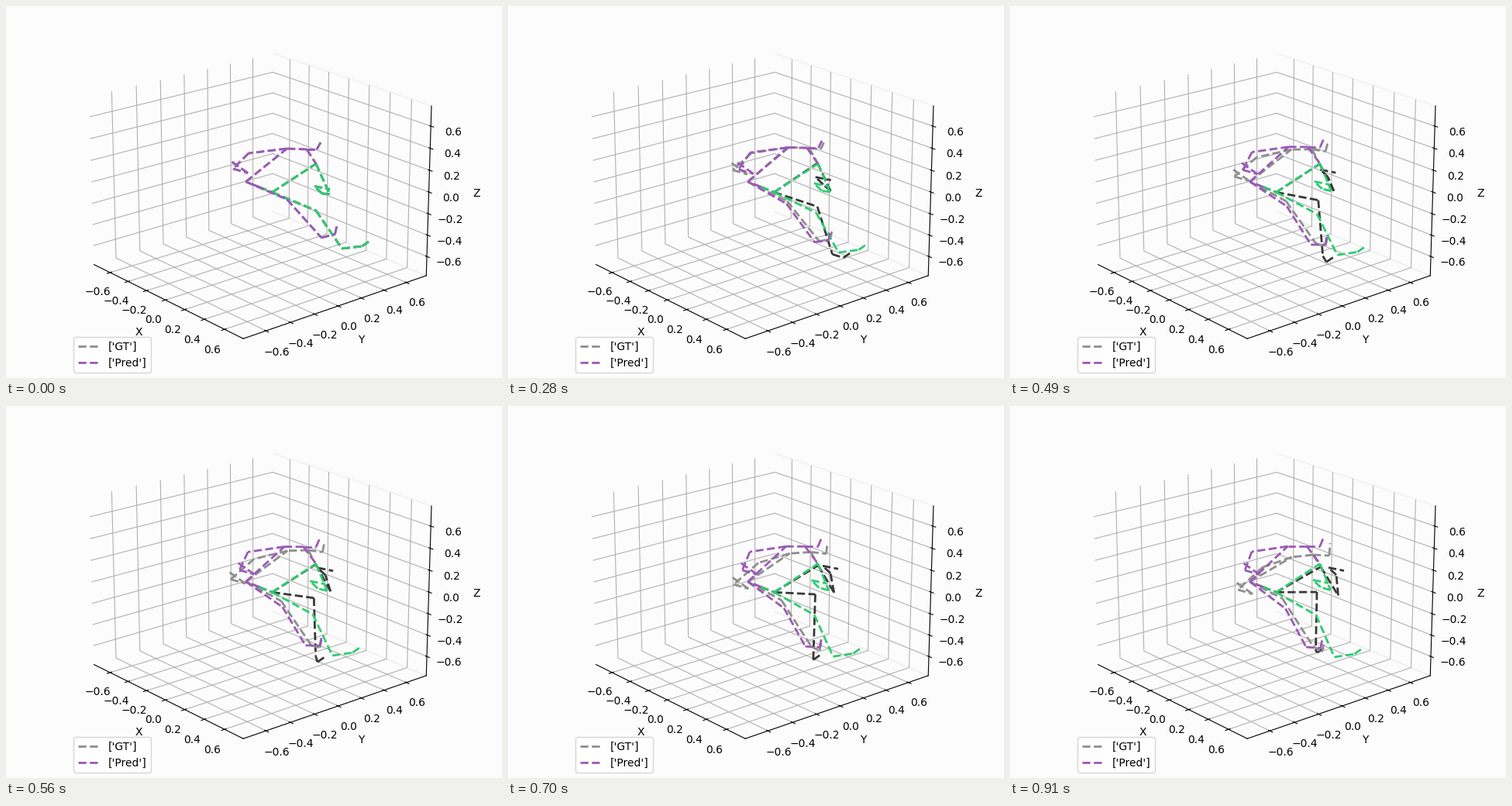
Recreate the animation shown at these times as a matplotlib script. Size 640 by 480 pixels, loop 0.98 s.

```python
import matplotlib.pyplot as plt
import numpy as np
from matplotlib.animation import FuncAnimation

W, H = 640, 480
FRAMES, STEP_MS = 14, 70
BACK = "#fcfcfc"

ROOT = np.array([326.5, 233.5])
HIP_OFFSET = np.array([17, 6.8])
HIPS = {"left": ROOT - HIP_OFFSET, "right": ROOT + HIP_OFFSET}

# Opening pose, shared by both bodies: joints from the trunk outwards.
START = {
    "left leg": [(362.5, 249.5), (407, 299), (424.5, 294.5), (427, 283)],
    "right leg": [(400, 264), (433.5, 313), (459.5, 310), (468, 304)],
    "left arm": [(362.5, 184), (313, 190), (293, 210), (312, 215.5), (288, 198.5)],
    "right arm": [(400, 203.5), (417.5, 242.5), (408, 242), (398, 232.5), (418, 236.5)],
    "head": [(388, 185), (401, 185), (406, 176)],
}

# How far the first joint, the second and the rigid end of each limb travel.
TRUE_DRIFT = {
    "left leg": [(-11, -1), (-16, 11), (-22, 23)],
    "right leg": [(-4, -24), (-39, 3), (-63, 8)],
    "left arm": [(1, 11), (13, 18), (1, 27)],
    "right arm": [(1, 4), (6, 2), (13, -24)],
    "head": [(3, 7), (11, 8), (7, 1)],
}
PRED_DRIFT = {
    "left leg": [(-7, 12), (-25, 12), (-24, 18)],
    "right leg": [(-5, 6), (-15, 11), (-15, 10)],
    "left arm": [(-4, -3), (-1, -2), (10, 2)],
    "right arm": [(0, 0), (-4, -5), (-7, -8)],
    "head": [(-5, -4), (-1, -4), (-2, -5)],
}

# Sideways bulge of the path, from the limb's first joint to its end.
TRUE_BOW = {
    "left leg": [(0, 3), (-5, 2)],
    "right leg": [(0, 0), (-16, 16)],
    "left arm": [(0, -5), (-4, -5)],
    "right arm": [(-1, -2), (-5, -8)],
    "head": [(0, -4), (0, 0)],
}


def ease_in_out(u):
    return (1 - np.cos(np.pi * u)) / 2


def ease_out(u):
    return np.sin(np.pi * u / 2)


def pose(drift, bow, ease, u):
    """Joint positions of every limb at progress u."""
    limbs = {}
    for name, points in START.items():
        part = np.minimum(np.arange(len(points)), 2)
        move = np.array(drift[name]) * ease(u)
        if bow:
            move = move + np.linspace(*np.array(bow[name]), 3) * np.sin(np.pi * u)
        limbs[name] = np.array(points) + move[part]
    return limbs


def bones(limbs):
    """Pairs of end points: right side, left side, then neck and head."""
    pairs = []
    for name in ("right", "left"):
        leg = [ROOT, HIPS[name], *limbs[name + " leg"]]
        arm = [HIPS[name], *limbs[name + " arm"]]
        pairs += [*zip(leg, leg[1:]), *zip(arm, arm[1:])]
    neck, nose, top = limbs["head"]
    shoulders = [(neck, limbs[name + " arm"][0]) for name in ("right", "left")]
    return pairs + shoulders + [(neck, nose), (nose, top)]


fig = plt.figure(figsize=(W / 100, H / 100), dpi=100, facecolor=BACK)

ax = fig.add_axes([0, 0, 1, 1], projection="3d", facecolor=BACK)
ax.view_init(elev=20, azim=-40)
for set_lim in (ax.set_xlim3d, ax.set_ylim3d, ax.set_zlim3d):
    set_lim(-0.75, 0.75, view_margin=1 / 48)
ax.set(xlabel="X", ylabel="Y", zlabel="Z")
for axis in (ax.xaxis, ax.yaxis, ax.zaxis):
    axis.pane.fill = False
ax.xaxis.pane.set_visible(False)

# Flat layer in screen pixels for the bodies.
layer = fig.add_axes([0, 0, 1, 1])
layer.set(xlim=(0, W), ylim=(H, 0))
layer.axis("off")


class Body:
    def __init__(self, left_color, right_color, drift, bow, ease):
        self.motion = drift, bow, ease
        pairs = bones(pose(*self.motion, 0))
        right_count = len(START["right leg"]) + len(START["right arm"]) + 1
        self.lines = [
            layer.plot([], [], "--", lw=2,
                       color=right_color if i < right_count else left_color)[0]
            for i in range(len(pairs))
        ]

    def update(self, u):
        for line, pair in zip(self.lines, bones(pose(*self.motion, u))):
            line.set_data(*np.transpose(pair))


GREY, PURPLE = "#8e8e8e", "#9b59b6"
bodies = [
    Body(GREY, "#383838", TRUE_DRIFT, TRUE_BOW, ease_in_out),
    Body(PURPLE, "#2ecc71", PRED_DRIFT, None, ease_out),
]

handles = [plt.Line2D([], [], ls="--", lw=2, color=c) for c in (GREY, PURPLE)]
ax.legend(handles, ["['GT']", "['Pred']"], loc="lower left")


def draw(frame):
    for body in bodies:
        body.update(frame / (FRAMES - 1))
    return [line for body in bodies for line in body.lines]


anim = FuncAnimation(fig, draw, frames=FRAMES, interval=STEP_MS,
                     repeat=True, repeat_delay=0, blit=False)
plt.show()
```
